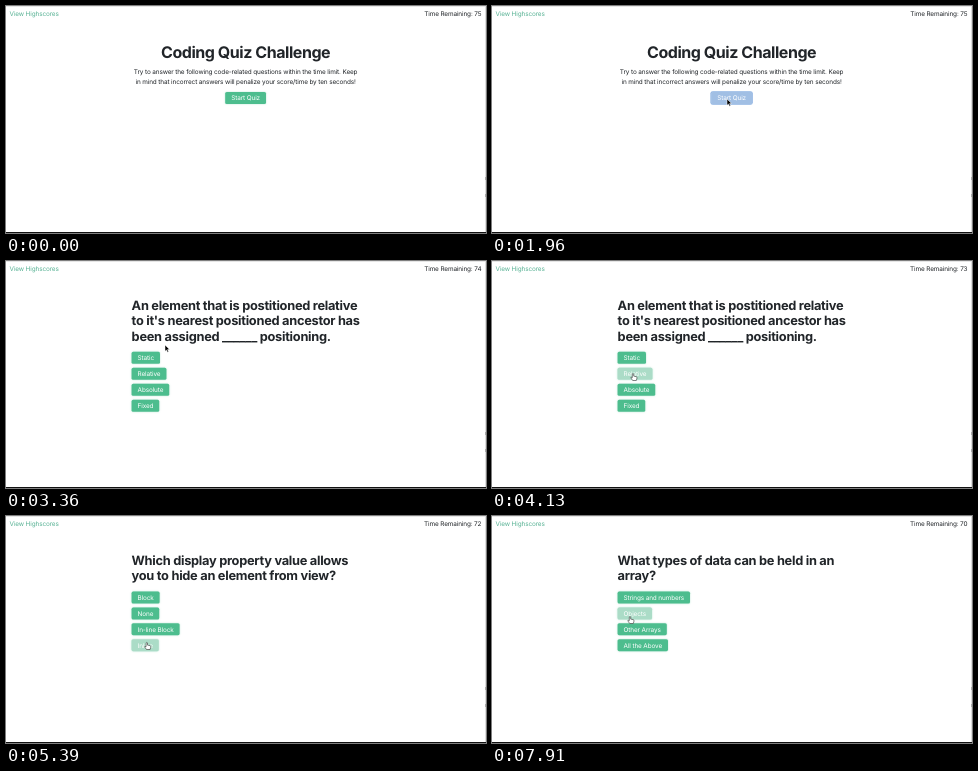
Animation of 480 by 227 pixels, one loop 8 s. Source, as an HTML page:

```html
<!DOCTYPE html>
<html lang="en">
<head>
<meta charset="utf-8">
<title>Coding Quiz</title>
<style>
html, body { margin: 0; width: 100%; height: 100%; overflow: hidden; background: #fff; }
body { position: relative; }
body > *, #link, #timer, #main { position: absolute; }
/* the page is laid out 1200px wide and shown at 40% */
#page {
  left: 0; top: 0; width: 1200px; height: 567px; transform: scale(.4); transform-origin: 0 0;
  color: #212529; font: 16px/24px Inter, "Liberation Sans", sans-serif; font-optical-sizing: none;
  letter-spacing: -.019em; white-space: nowrap; text-rendering: geometricPrecision;
}
#link { left: 9px; top: 8px; color: #56b193; }
#timer { right: 11.5px; top: 8px; }
#main { left: 314px; top: 92.5px; width: 570px; }
#main.intro { text-align: center; }
h1, h2, p { margin: 0; }
h1 { font-size: 40px; line-height: 48px; letter-spacing: -.028em; margin-bottom: 11.5px; }
h2 { font-size: 32px; line-height: 38.4px; letter-spacing: -.0215em; margin-bottom: 19.5px; }
p { margin-bottom: 15px; }
.btn {
  display: table; height: 30px; line-height: 30px; padding: 0 15px; margin-bottom: 9.8px;
  border-radius: 4px; background: #4dbd8e; color: #fff; box-shadow: 0 0 4px #4dbd8e88;
}
.intro .btn { margin: 0 auto; }
.btn.hover { background: #abdcc7; }
.btn.press { background: #a1bfe4; box-shadow: 0 0 0 2px #8db2e2; }
#note { font-size: 20px; line-height: 25px; margin-top: 15px; }
#top { left: 0; top: 0; width: 100%; height: .6px; background: #e6e6e6; }
#edge { right: 0; top: 0; width: .7px; height: 100%; background: #ddd; }
.tick { right: 0; width: 1px; height: 3px; background: #aaa; }
#base { left: 0; bottom: 0; width: 100%; height: 1.4px; background: #111; }
#cursor { left: 0; top: 0; overflow: visible; }
</style>
</head>
<body>
<div id="page">
  <div id="link">View Highscores</div>
  <div id="timer"></div>
  <div id="main"></div>
</div>
<div id="top"></div>
<div id="edge"></div>
<div class="tick" style="top:171px"></div>
<div class="tick" style="top:188px"></div>
<div id="base"></div>
<svg id="cursor" width="10" height="10">
  <path id="arrow" d="M0 0V6.3L1.5 5L2.5 7.3L3.6 6.8L2.6 4.6H4.6Z" fill="#000" stroke="#fff" stroke-width=".5"/>
  <path id="hand" d="M-.7 .4Q0 -.5 .7 .4V2.6L3.4 3.2Q4.2 3.5 4 4.6L3.3 7H-.3L-2.2 4.3Q-2.2 3.2 -.7 4.2Z"
    fill="#fff" stroke="#333" stroke-width=".6"/>
</svg>
<script>
const LOOP = 8000, STEP = 70;
const $ = id => document.getElementById(id);

const question = (title, ...answers) =>
  `<h2>${title}</h2>` + answers.map(a => `<div class="btn">${a}</div>`).join("") + `<div id="note"></div>`;

const scenes = [
  [0, `<h1>Coding Quiz Challenge</h1>
    <p>Try to answer the following code-related questions within the time limit. Keep<br>
    in mind that incorrect answers will penalize your score/time by ten seconds!</p>
    <div class="btn">Start Quiz</div>`],
  [2030, question("An element that is postitioned relative<br>to it's nearest positioned ancestor has<br>been assigned ______ positioning.",
    "Static", "Relative", "Absolute", "Fixed")],
  [5390, question("Which display property value allows<br>you to hide an element from view?",
    "Block", "None", "In-line Block", "Inline")],
  [7910, question("What types of data can be held in an<br>array?",
    "Strings and numbers", "Objects", "Other Arrays", "All the Above")]
];
const ticks = [3080, 4130, 5110, 6160, 7210];
const notes = [[4830, 5390], [7350, 7910]];

// pointer path: time, x, y
const path = [
  [70, 336, 204], [350, 149, 112], [700, 229, 84], [980, 229, 84], [1050, 236, 91],
  [1190, 235, 92], [1820, 235, 93], [2660, 235, 93], [3150, 165, 86], [3290, 165, 86],
  [3360, 159, 84], [3850, 143, 130], [4130, 141, 112.5], [4550, 141, 127], [4690, 141, 127],
  [4900, 140.8, 126.5], [5810, 140.8, 126.5], [6650, 138, 100.5], [LOOP, 138, 100.5]
];

function pointerAt(t) {
  const i = Math.max(1, path.findIndex(k => k[0] >= t));
  const [t0, x0, y0] = path[i - 1], [t1, x1, y1] = path[i];
  const u = Math.max(0, (t - t0) / (t1 - t0)), e = u * u * (3 - 2 * u);
  return [x0 + (x1 - x0) * e, y0 + (y1 - y0) * e];
}

let shown = -1;
function draw(now) {
  const t = Math.floor(now % LOOP / STEP) * STEP;
  const scene = scenes.filter(s => s[0] <= t).length - 1;
  if (scene !== shown) {
    $("main").innerHTML = scenes[scene][1];
    $("main").className = scene ? "" : "intro";
    shown = scene;
  }
  $("timer").textContent = "Time Remaining: " + (75 - ticks.filter(k => k <= t).length);
  if (scene) $("note").textContent = notes.some(([a, b]) => t >= a && t < b) ? "Correct!" : "";

  const [x, y] = pointerAt(t);
  let over = false;
  for (const b of document.querySelectorAll(".btn")) {
    const r = b.getBoundingClientRect();
    const hit = t >= 1470 && x > r.left && x < r.right && y > r.top && y < r.bottom;
    b.className = "btn" + (!hit ? "" : !scene && t >= 1960 ? " press" : " hover");
    over ||= hit;
  }
  const hand = over && scene > 0;
  $("cursor").style.transform = `translate(${x}px, ${y}px)`;
  $("cursor").style.display = t < 70 ? "none" : "";
  $("arrow").style.display = hand ? "none" : "";
  $("hand").style.display = hand ? "" : "none";
}

const start = performance.now();
function loop() {
  draw(performance.now() - start);
  requestAnimationFrame(loop);
}
loop();
</script>
</body>
</html>
```
